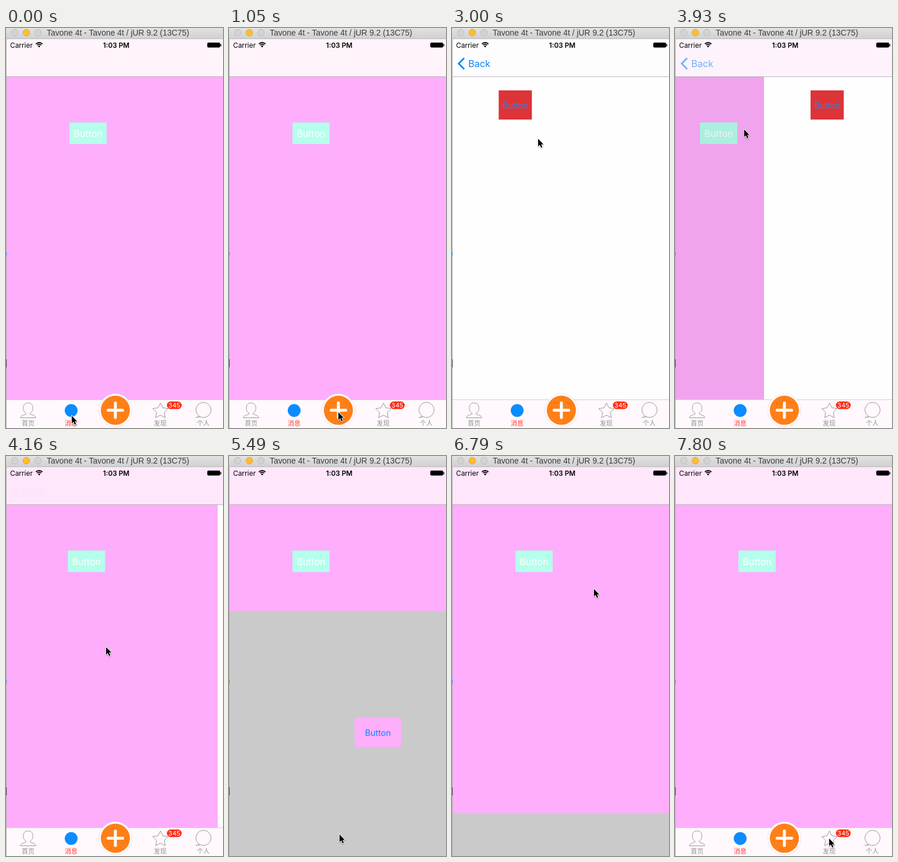
An HTML page with a canvas for the animation above (8 s loop, 373 by 686 pixels).

```html
<!DOCTYPE html>
<html lang="zh">
<head>
<meta charset="utf-8">
<title>Tab bar demo</title>
<style>
html, body { margin: 0; width: 100%; height: 100%; overflow: hidden; }
canvas { display: block; }
</style>
</head>
<body>
<canvas id="stage" width="373" height="686"></canvas>
<script>
const ctx = document.getElementById('stage').getContext('2d');
const W = 373, H = 686, TOP = 19, NAV = 83, TAB = 637, LOOP = 8000;
const PINK = '#ffaefc', BLUE = '#0a85ff', GRAY = '#999';
const UI = 'Inter, Roboto, sans-serif', CJK = '"Noto Sans CJK SC", "Noto Sans CJK", sans-serif';

// Pointer tip: time, x, y
const path = [
  [0, 112, 664], [260, 112, 664], [620, 300, 661], [1050, 187, 658],
  [1190, 187, 658], [1520, 251, 661], [1650, 251, 661], [1870, 181, 255],
  [1990, 181, 255], [2220, 147, 189], [3110, 147, 189], [3290, 107, 140],
  [3340, 106, 139], [3880, 106, 139], [4160, 171, 326], [4480, 182, 546],
  [4670, 182, 546], [5130, 189, 648], [5640, 189, 648], [5900, 217, 276],
  [6030, 217, 276], [6080, 219, 269], [6320, 243, 227], [6800, 243, 227],
  [7260, 241, 599], [7390, 241, 599], [7800, 264, 655], [LOOP, 264, 655]
];

// Critically damped spring from 0 to 1
function spring(t, start) {
  const x = Math.max(0, t - start) * 0.01826;
  return 1 - (1 + x) * Math.exp(-x);
}

function rect(x, y, w, h, color) {
  ctx.fillStyle = color;
  ctx.fillRect(x, y, w, h);
}

function disc(x, y, r, fill, stroke) {
  ctx.beginPath();
  ctx.arc(x, y, r, 0, 7);
  ctx.fillStyle = fill;
  ctx.fill();
  if (stroke) outline(stroke, 1);
}

function pill(x, y, w, h, r, color) {
  ctx.beginPath();
  ctx.roundRect(x, y, w, h, r);
  ctx.fillStyle = color;
  ctx.fill();
}

function outline(color, width) {
  ctx.strokeStyle = color;
  ctx.lineWidth = width;
  ctx.stroke();
}

function text(s, x, y, font, color, align = 'center') {
  ctx.font = font;
  ctx.fillStyle = color;
  ctx.textAlign = align;
  ctx.fillText(s, x, y);
}

function button(x, y, w, h, fill, color, size) {
  rect(x, y, w, h, fill);
  text('Button', x + w / 2, y + h / 2 + size * 0.39, size + 'px ' + UI, color);
}

function pages(push, navColor) {
  ctx.save();
  ctx.translate(-0.3 * push * W, 0);
  rect(0, NAV, 2 * W, H, PINK);
  button(109, 162, 64, 37, '#b5ffec', '#fff', 16.1);
  ctx.restore();
  rect(0, NAV, W, H, `rgba(0,0,0,${0.1 * push})`);

  ctx.save();
  ctx.translate((1 - push) * W, 0);
  rect(0, NAV, W, H, '#fefefe');
  button(80, 107, 57, 50, '#dc3439', '#3a7fdc', 14.3);
  ctx.restore();

  rect(0, TOP, W, NAV - TOP, navColor);
  ctx.globalAlpha = push;
  rect(0, TOP, W, NAV - TOP, '#fefdfe');
  ctx.beginPath();
  ctx.moveTo(21, 51.5);
  ctx.lineTo(11.5, 61);
  ctx.lineTo(21, 70.5);
  outline(BLUE, 2.8);
  text('Back', 28, 67, '16.3px ' + UI, BLUE, 'left');
  ctx.globalAlpha = 1;
  rect(0, NAV, W, 1, 'rgba(178,170,176,.85)');
}

function person(x, y) {
  const body = new Path2D('M-3.5 4.5C-8 2-8.5-2-8-6C-7.5-11-4-13 0-13S7.5-11 8-6' +
    'C8.5-2 8 2 3.5 4.5V6C7 8 13 8 13 12.5H-13C-13 8-7 8-3.5 6Z');
  ctx.save();
  ctx.translate(x, y);
  ctx.strokeStyle = GRAY;
  ctx.lineWidth = 1;
  ctx.stroke(body);
  ctx.restore();
}

function star(x, y) {
  ctx.beginPath();
  for (let i = 0; i < 10; i++) {
    const r = i % 2 ? 7 : 14, a = i * Math.PI / 5;
    ctx.lineTo(x + r * Math.sin(a), y - r * Math.cos(a));
  }
  ctx.closePath();
  outline(GRAY, 1);
}

function bubble(x, y) {
  ctx.beginPath();
  ctx.arc(x, y, 13, 2.05, 8.83);
  ctx.lineTo(x - 13, y + 13);
  ctx.closePath();
  outline(GRAY, 1);
}

function plusButton(x, y) {
  disc(x, y, 28.5, '#fffafe', 'rgba(0,0,0,.07)');
  disc(x, y, 25, '#ff7f17');
  ctx.lineCap = 'round';
  ctx.beginPath();
  ctx.moveTo(x - 12.5, y);
  ctx.lineTo(x + 12.5, y);
  ctx.moveTo(x, y - 12.5);
  ctx.lineTo(x, y + 12.5);
  outline('#fff', 5);
  ctx.lineCap = 'butt';
}

function tabBar() {
  rect(0, TAB, W, H - TAB, '#fff8fd');
  rect(0, TAB, W, 1, 'rgba(0,0,0,.17)');
  plusButton(188, 655.6);
  person(38, 656);
  disc(112, 656, 11, '#0b8cff');
  star(265.5, 657);
  bubble(339.5, 655);
  pill(276.5, 640.5, 25.5, 13, 6.5, '#ff2a12');
  text('345', 289.3, 651, '11px ' + UI, '#fff');
  [['首页', 38], ['消息', 112], ['发现', 265], ['个人', 339]].forEach(([s, x], i) =>
    text(s, x, 682, '11px ' + CJK, i === 1 ? '#ff3b30' : '#929292'));
}

function modal(shown) {
  if (shown < 0.001) return;
  const y = Math.round(TOP + (1 - shown) * (H - TOP));
  rect(0, y, W, H, '#cacaca');
  button(216, y + 183, 80, 50, PINK, BLUE, 14.5);
}

function statusBar() {
  text('Carrier', 7, 33.5, '11.9px ' + UI, '#000', 'left');
  text('1:03 PM', 189.5, 33.5, '600 11.8px ' + UI, '#000');
  for (const r of [8, 5]) {
    ctx.beginPath();
    ctx.arc(57, 33, r, -2.35, -0.79);
    outline('#000', 1.8);
  }
  ctx.beginPath();
  ctx.moveTo(57, 33.5);
  ctx.arc(57, 33, 2.8, -2.35, -0.79);
  ctx.fillStyle = '#000';
  ctx.fill();
  pill(346, 25, 22, 8.5, 2, '#000');
  rect(368.5, 27.5, 1.5, 4, '#000');
}

function windowFrame() {
  const g = ctx.createLinearGradient(0, 0, 0, TOP);
  g.addColorStop(0, '#e2e2e2');
  g.addColorStop(1, '#d0d0d0');
  rect(0, 0, W, TOP, g);
  rect(0, TOP - 1, W, 1, '#bcbcbc');
  disc(15, 8, 5.7, '#d3d3d3', '#bebebe');
  disc(35, 8, 5.7, '#fdbd30', '#e4a532');
  disc(55, 8, 5.7, '#d3d3d3', '#bebebe');
  text('Tavone 4t - Tavone 4t / jUR 9.2 (13C75)', 70, 13,
    '13.9px "Liberation Sans", Arial, sans-serif', '#3c3c3c', 'left');
  rect(0, TOP, 1, H, '#b0b0b0');
  rect(0, 384, 1, 6, '#2b8be0');
  rect(0, 568, 1, 14, '#333');
}

function pointer(t) {
  const i = path.findIndex(k => k[0] > t);
  const [t0, x0, y0] = path[i - 1], [t1, x1, y1] = path[i];
  const f = (t - t0) / (t1 - t0);
  const arrow = new Path2D('M0 0V13L3 10.2L5.2 15.2L7.3 14.3L5.2 9.4H9.2Z');
  ctx.save();
  ctx.translate(x0 + (x1 - x0) * f + 1, y0 + (y1 - y0) * f + 1);
  ctx.lineJoin = 'round';
  ctx.strokeStyle = '#fff';
  ctx.lineWidth = 1.8;
  ctx.shadowColor = 'rgba(0,0,0,.35)';
  ctx.shadowBlur = 2;
  ctx.shadowOffsetY = 1;
  ctx.stroke(arrow);
  ctx.shadowColor = 'transparent';
  ctx.fillStyle = '#000';
  ctx.fill(arrow);
  ctx.restore();
}

function draw() {
  const t = performance.now() % LOOP;
  pages(spring(t, 2480) - spring(t, 3854), t < 3000 ? '#fff4fb' : '#ffe6fb');
  tabBar();
  modal(spring(t, 5374) - spring(t, 6585));
  statusBar();
  windowFrame();
  pointer(t);
  requestAnimationFrame(draw);
}

draw();
</script>
</body>
</html>
```
